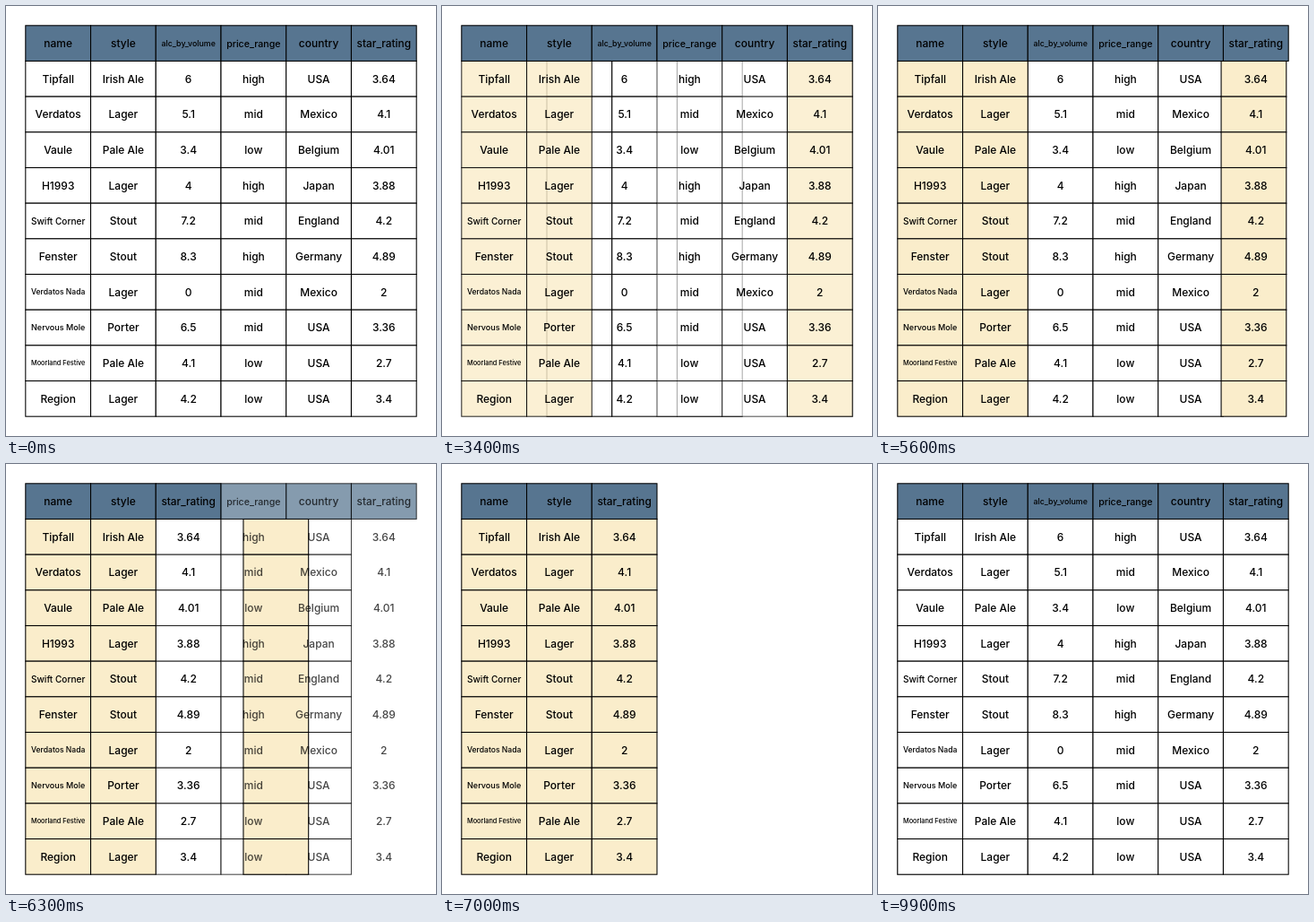
These frames come from a looping animation (480x480 px, 10000 ms). An HTML page:

```html
<!DOCTYPE html>
<html lang="en">
<head>
<meta charset="utf-8">
<title>Selecting table columns</title>
<style>
  html, body { margin: 0; width: 100%; height: 100%; overflow: hidden; background: #fff; }
  svg { display: block; width: 100%; height: 100%; }
  rect { stroke: #000; stroke-width: 1.07; }
  text { font-family: Inter, sans-serif; font-weight: 500; text-anchor: middle; }
</style>
</head>
<body>
<svg id="stage" viewBox="0 0 480 480"></svg>
<script>
const NS = 'http://www.w3.org/2000/svg';
const stage = document.getElementById('stage');
const CELL_W = 480 / 6.6, CELL_H = 480 / 12.1, EDGE = 480 / 22;
const FONT = 12, MAX_TEXT = 60.5;
const BLUE = '#577590', CREAM = '#faedcb', WHITE = '#fff';

const table = `name,style,alc_by_volume,price_range,country,star_rating
Tipfall,Irish Ale,6,high,USA,3.64
Verdatos,Lager,5.1,mid,Mexico,4.1
Vaule,Pale Ale,3.4,low,Belgium,4.01
H1993,Lager,4,high,Japan,3.88
Swift Corner,Stout,7.2,mid,England,4.2
Fenster,Stout,8.3,high,Germany,4.89
Verdatos Nada,Lager,0,mid,Mexico,2
Nervous Mole,Porter,6.5,mid,USA,3.36
Moorland Festive,Pale Ale,4.1,low,USA,2.7
Region,Lager,4.2,low,USA,3.4`.split('\n').map(line => line.split(','));
const COLS = [0, 1, 2, 3, 4, 5];

function add(parent, tag, attrs = {}) {
  const el = document.createElementNS(NS, tag);
  for (const key in attrs) el.setAttribute(key, attrs[key]);
  return parent.appendChild(el);
}

function tiles(col, fill, from = 1, to = 10) {
  const g = add(stage, 'g', { fill });
  for (let row = from; row <= to; row++) {
    add(g, 'rect', { x: EDGE + col * CELL_W, y: EDGE + row * CELL_H, width: CELL_W, height: CELL_H });
  }
  return g;
}

// Labels wider than the cell shrink to fit.
function labels(col, at = col) {
  const g = add(stage, 'g');
  table.forEach((cells, row) => {
    const t = add(g, 'text', { x: EDGE + (at + 0.5) * CELL_W, 'font-size': FONT });
    t.textContent = cells[col];
    const size = FONT * Math.min(1, MAX_TEXT / t.getComputedTextLength());
    t.setAttribute('font-size', size);
    t.setAttribute('y', EDGE + (row + 0.5) * CELL_H + size * 0.364);
  });
  return g;
}

// Creation order is stacking order.
const plain = COLS.map(c => tiles(c, WHITE));
const picked = [0, 1, 5].map(c => tiles(c, CREAM));
const fresh = COLS.map(c => tiles(c, WHITE));
const heads = COLS.map(c => tiles(c, BLUE, 0, 0));
const texts = COLS.map(c => labels(c));
const rating = labels(5, 2);

function show(g, alpha, dx = 0) {
  g.setAttribute('display', alpha ? 'inline' : 'none');
  g.setAttribute('fill-opacity', alpha);
  g.setAttribute('stroke-opacity', alpha);
  g.setAttribute('transform', `translate(${dx} 0)`);
}

const fadeIn = p => p > 0 ? 0.5 + p / 2 : 0;
const fadeOut = p => p < 1 ? 1 - p / 2 : 0;

function draw(ms) {
  const tick = Math.floor(ms / 100 + 1e-6) % 100;
  const ease = start => {
    const p = Math.min(1, Math.max(0, (tick - start) / 15));
    return p === 1 ? 1 : (1 - Math.cos(Math.PI * p)) / 2;
  };
  const mark = ease(25), select = ease(55), reset = ease(85);

  plain.forEach((g, c) => c < 3
    ? show(g, fadeOut(select), 2 * CELL_W * mark)
    : show(g, fadeOut(mark)));
  picked.forEach((g, i) =>
    show(g, fadeIn(mark) * fadeOut(reset), i === 2 ? -3 * CELL_W * select : 0));
  fresh.forEach(g => show(g, fadeIn(reset)));

  const rest = fadeOut(select) || fadeIn(reset);
  for (const c of [3, 4, 5]) {
    show(heads[c], rest);
    show(texts[c], rest);
  }
  const swapped = select >= 0.5 && reset < 0.5;
  show(texts[2], swapped ? 0 : 1);
  show(rating, swapped ? 1 : 0);
}

const begin = performance.now();
function loop() {
  draw(performance.now() - begin);
  requestAnimationFrame(loop);
}
loop();
</script>
</body>
</html>
```
